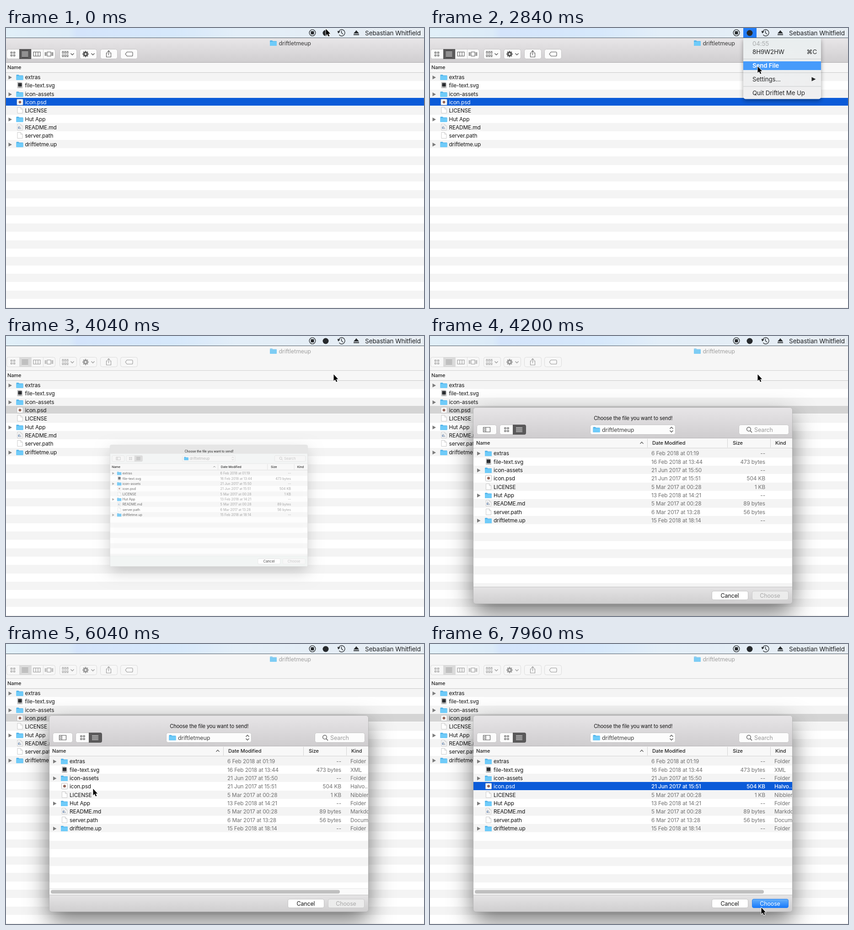
These frames come from a looping animation (914 by 613 pixels, 8 s). An HTML page with a canvas:

```html
<!DOCTYPE html>
<html lang="en">
<head>
<meta charset="utf-8">
<title>Choosing a file to send</title>
<style>
html, body { margin: 0; width: 100%; height: 100%; overflow: hidden; background: #fff; }
canvas { display: block; width: 914px; height: 613px; }
</style>
</head>
<body>
<canvas id="stage" width="914" height="613"></canvas>
<script>
const c = document.getElementById('stage').getContext('2d');
const LOOP = 8000, ROW = 18.33;

// name, icon, modified, size, kind
const files = [
  ['extras', 'folder', '6 Feb 2018 at 01:19', '--', 'Folder'],
  ['file-text.svg', 'svg', '16 Feb 2018 at 13:44', '473 bytes', 'XML'],
  ['icon-assets', 'folder', '21 Jun 2017 at 15:50', '--', 'Folder'],
  ['icon.psd', 'psd', '21 Jun 2017 at 15:51', '504 KB', 'Halvo...'],
  ['LICENSE', 'page', '5 Mar 2017 at 00:28', '1 KB', 'Nibbler'],
  ['Hut App', 'folder', '13 Feb 2018 at 14:21', '--', 'Folder'],
  ['README.md', 'md', '5 Mar 2017 at 00:28', '89 bytes', 'Markdown'],
  ['server.path', 'page', '6 Mar 2017 at 13:28', '56 bytes', 'Document'],
  ['driftletme.up', 'folder', '15 Feb 2018 at 18:14', '--', 'Folder']
];
const FOLDER = 'driftletmeup';

// pointer tip: time, x, y
const track = [
  [0, 699, 2], [40, 699, 2], [200, 702, 3], [720, 702, 3], [1480, 704, 12], [1560, 704, 12],
  [1960, 712, 121], [2160, 716, 88], [2560, 716, 88], [2760, 716, 84], [4760, 716, 84],
  [5560, 250, 248], [6040, 190, 317], [6400, 190, 317], [7040, 668, 491],
  [7440, 736, 562], [7840, 724, 577], [8000, 724, 577]
];

const clamp = v => Math.max(0, Math.min(1, v));

// slope at a key; zero at holds and turning points
function slope(i, k) {
  const a = track[i - 1], b = track[i], d = track[i + 1];
  if (!a || !d || (b[k] - a[k]) * (d[k] - b[k]) <= 0) return 0;
  return (d[k] - a[k]) / (d[0] - a[0]);
}

function pointerAt(t) {
  let i = 0;
  while (i < track.length - 2 && t >= track[i + 1][0]) i++;
  const a = track[i], b = track[i + 1], h = b[0] - a[0], u = clamp((t - a[0]) / h);
  const v = 1 - u;
  return [1, 2].map(k =>
    a[k] * (1 + 2 * u) * v * v + b[k] * u * u * (3 - 2 * u) +
    h * u * v * (slope(i, k) * v - slope(i + 1, k) * u));
}

function box(x, y, w, h, fill) { c.fillStyle = fill; c.fillRect(x, y, w, h); }

function round(x, y, w, h, r, fill, stroke) {
  c.beginPath(); c.roundRect(x, y, w, h, r);
  if (fill) { c.fillStyle = fill; c.fill(); }
  if (stroke) { c.strokeStyle = stroke; c.lineWidth = 1; c.stroke(); }
}

function disc(x, y, r, fill) {
  c.beginPath(); c.arc(x, y, r, 0, 7); c.fillStyle = fill; c.fill();
}

// open strokes or a filled shape from an SVG path
function path(d, color, width) {
  const p = new Path2D(d);
  if (width) { c.strokeStyle = color; c.lineWidth = width; c.stroke(p); }
  else { c.fillStyle = color; c.fill(p); }
}

function fade(y0, y1, a, b) {
  const g = c.createLinearGradient(0, y0, 0, y1);
  g.addColorStop(0, a); g.addColorStop(1, b);
  return g;
}

function text(s, x, y, size, color = '#111', weight = 400, align = 'left') {
  c.font = `${weight} ${size}px Inter, Roboto, sans-serif`;
  c.letterSpacing = '-0.1px';
  c.textAlign = align;
  c.fillStyle = color;
  c.fillText(s, x, y);
}

function at(x, y, draw) { c.save(); c.translate(x, y); draw(); c.restore(); }

function folder(x, y) {
  at(x, y, () => {
    path('M0 1.5Q0 .3 1.2 .3H5L6.5 1.8H14Q15 1.8 15 3V11Q15 12 14 12H1Q0 12 0 11Z', '#4fb3ea');
    round(0, 3, 15, 9, 1, '#6fcbf9');
  });
}

function fileIcon(kind, x, y) {
  if (kind === 'folder') return folder(x, y + 4);
  at(x, y, () => {
    if (kind === 'psd') {
      round(1.5, 3, 13, 12.5, 1, '#fff', '#bbb');
      return disc(8, 9.2, 3, '#94675a');
    }
    path('M2.5 2.5H9.5L13.5 6.5V15.5H2.5Z', '#fff');
    path('M2.5 2.5H9.5L13.5 6.5V15.5H2.5ZM9.5 2.5V6.5H13.5', '#c4c4c4', .9);
    if (kind === 'svg') {
      box(2.5, 3, 10.5, 12, '#c9c9c9');
      box(4, 4.5, 8, 7.5, '#2b2d31');
      box(5, 13, 6, 1, '#777');
    }
    if (kind === 'md') {
      path('M4.5 6.5H7.5M4.5 8.5H9M6 10.5H11M4.5 12.5H11', '#8d99a8', 1);
      box(4, 9, 2, 3, '#6d8fc0');
    }
  });
}

function fileRows(x, top, bottom, right, picked, pickFill, white, details) {
  for (let i = 0; top + i * ROW < bottom; i++) {
    const y = Math.round(top + i * ROW), next = Math.min(Math.round(top + (i + 1) * ROW), bottom);
    const left = x - 3, chosen = i === picked;
    box(left, y, right - left, next - y, i % 2 ? '#fff' : '#f4f4f4');
    if (chosen) box(left, y, right - left, next - y - 1, pickFill);
    const f = files[i];
    if (!f) continue;
    const ink = chosen && white ? '#fff' : '#111';
    if (f[1] === 'folder') at(x, y, () => path('M5.5 6V14.4L13 10.2Z', '#7c7c7c'));
    fileIcon(f[1], x + 22.5, y);
    text(f[0], x + 41.5, y + 14, 11.8, ink);
    if (details) details(f, y + 14, chosen);
  }
}

const GRID = 'M-4.5-4.5h3v3h-3zM1.5-4.5h3v3h-3zM-4.5 1.5h3v3h-3zM1.5 1.5h3v3h-3z';
const LIST = 'M-7-4.5H7M-7-1.5H7M-7 1.5H7M-7 4.5H7';
const CHEVRON = 'M-3.5-1.5L0 2L3.5-1.5';

function glyph(d, x, y, color, width = 1.1) { at(x, y, () => path(d, color, width)); }

function button(x, y, w, active) {
  round(x + .5, y + .5, w - 1, 21, 4, active ? '#fcfcfc' : '#f7f7f7', active ? '#c6c5c6' : '#dcdcdc');
}

function finder(active) {
  const ink = active ? '#555' : '#9a9a9a', edge = active ? '#d0d0d0' : '#dedede';
  box(0, 22, 914, 53, active ? fade(22, 75, '#e8e6e8', '#d0ced0') : '#f6f6f6');
  box(0, 75, 914, 1, active ? '#aeacae' : '#d0d0d0');
  c.save();
  if (!active) c.globalAlpha = .6;
  folder(577, 27);
  c.restore();
  text(FOLDER, 596.5, 38, 12.5, active ? '#3a3a3a' : '#a2a2a2');

  [[1, 107], [117, 38], [161, 38], [206, 38], [250, 38]].forEach(b => button(b[0], 46, b[1], active));
  [55, 81].forEach(x => box(x, 47, 1, 20, edge));
  box(29, 46, 26, 22, active ? '#5a595a' : '#dadada');
  glyph(GRID, 15, 57, ink);
  glyph(LIST, 41.5, 57, active ? '#fff' : '#8a8a8a', 1.2);
  glyph('M-7.5-4.5h15v9h-15zM-2.5-4.5v9M2.5-4.5v9', 67.5, 57, ink);
  glyph('M-4-4.5h8v9h-8zM-8.5-4v8M-6.5-4v8M6.5-4v8M8.5-4v8', 94, 57, ink);
  [-5, 0, 5].forEach(dx => glyph('M-1.5-4.5h3v3h-3zM-1.5 1.5h3v3h-3zM-2-6h4M-2 6h4', 129.5 + dx, 57, ink, .9));
  glyph(CHEVRON, 145, 57, ink, 1.4);
  at(174, 57, () => {
    for (let i = 0; i < 8; i++) { c.rotate(Math.PI / 4); box(-1.3, -6.8, 2.6, 4, ink); }
    c.beginPath(); c.arc(0, 0, 3.5, 0, 7);
    c.strokeStyle = ink; c.lineWidth = 3; c.stroke();
  });
  glyph(CHEVRON, 190, 57, ink, 1.4);
  glyph('M-2-2H-5V7H5V-2H2M0 3V-7M-3-4L0-7L3-4', 224.5, 56.5, ink);
  glyph('M-8 0L-4.5-4.5H6Q8-4.5 8-2.5V2.5Q8 4.5 6 4.5H-4.5Z', 269, 57, ink);

  box(0, 76, 914, 21, '#f7f7f7');
  box(0, 97, 914, 1, '#c9c9c9');
  text('Name', 3, 90, 11, '#222', 500);
  fileRows(0, 98, 613, 914, 3, active ? '#0b5bd8' : '#d4d4d4', active);
}

function menuBar(lit) {
  const g = c.createLinearGradient(0, 0, 914, 0);
  [[0, '#e1eff8'], [.15, '#dcebf8'], [.17, '#d4e4fb'], [.4, '#d6e8fb'], [.55, '#e3eef8'], [1, '#e7edf3']]
    .forEach(s => g.addColorStop(...s));
  box(0, 0, 914, 21, g);
  box(0, 21, 914, 1, '#505c66');
  const ink = '#272a2d';
  if (lit) box(685, 0, 29, 21, '#227cf6');
  c.beginPath(); c.arc(670, 10.5, 6.8, 0, 7);
  c.strokeStyle = ink; c.lineWidth = 1.3; c.stroke();
  round(666.5, 7, 7, 7, 1, ink);
  disc(699, 11, 6.5, ink);
  c.beginPath(); c.arc(734, 10.5, 7, -2.7, 2.5);
  c.lineWidth = 1.3; c.stroke();
  path('M724.5 6.5L731 7.5L726.5 12Z', ink);
  path('M733.5 6V10.5L737 13.5', ink, 1.3);
  path('M766 5L772 12H760ZM760 13.5H772V15.5H760Z', ink);
  text('Sebastian Whitfield', 907, 15.5, 13.6, '#1d1f21', 400, 'right');
}

const menuRows = [
  ['04:55', 39, '#a9acad'], ['8H9W2HW', 57], ['Send File', 87], ['Settings...', 117], ['Quit Driftlet Me Up', 147]
];

function menu(alpha, hoverY, blink) {
  c.save();
  c.globalAlpha = alpha;
  c.shadowColor = 'rgba(0,0,0,.35)'; c.shadowBlur = 10; c.shadowOffsetY = 4;
  round(685, 22, 170, 133.5, [0, 0, 5, 5], fade(22, 155, '#e9eeef', '#f0eff0'));
  c.shadowColor = 'transparent';
  [67, 97, 127].forEach(y => box(685, y, 170, 1.5, '#d5d7d8'));
  menuRows.forEach(([label, y, tint], i) => {
    const lit = i && !blink && hoverY >= y - 14 && hoverY < y + 5;
    if (lit) box(685, y - 14, 170, 19, '#469bfb');
    const ink = lit ? '#fff' : tint || '#262728';
    text(label, 705, y, 13.3, ink, i === 2 ? 600 : 400);
    if (i === 1) text('⌘C', 846, y, 13.3, ink, 400, 'right');
    if (i === 3) path('M834.5 107.5V116.5L843.5 112Z', ink);
  });
  c.restore();
}

function pushButton(label, x, w, fill, ink, edge) {
  round(x + .5, 558.5, w - 1, 19, 3.5, fill, edge);
  text(label, x + w / 2 - .5, 572.5, 12.4, ink, 400, 'center');
}

function dialog(scale, loaded, picked) {
  const active = scale === 1, ink = active ? '#555' : '#bbb';
  c.save();
  c.translate(443.5, 371.5); c.scale(scale, scale); c.translate(-443.5, -371.5);
  c.globalAlpha = Math.min(1, scale * 1.5);
  c.shadowColor = active ? 'rgba(0,0,0,.55)' : 'rgba(0,0,0,.2)';
  c.shadowBlur = 52 * scale; c.shadowOffsetY = 20 * scale;
  round(95, 157, 697, 429, 5, '#fff');
  c.shadowColor = 'transparent';
  round(95, 157, 697, 429, 5, null, active ? '#a9a9a9' : '#ccc');
  c.beginPath(); c.roundRect(95, 157, 697, 429, 5); c.clip();

  box(95, 157, 697, 66, active ? fade(157, 223, '#e7e5e7', '#cfcdcf') : '#f3f5f5');
  if (!active) box(95, 157, 697, 31, '#e6e6e6');
  box(95, 223, 697, 1, active ? '#b3b1b3' : '#ddd');
  text('Choose the file you want to send!', 444.3, 184, 11.1, '#111', 400, 'center');
  [[102, 44], [152, 58], [350, 187], [675, 110]].forEach(b => button(b[0], 194, b[1], active));
  round(181, 194, 29, 22, [0, 4, 4, 0], active ? '#5a595a' : '#dcdcdc');
  glyph('M-7.5-5h15v10h-15zM-2-5v10M-6-2.5h2.5M-6 0h2.5M-6 2.5h2.5', 124, 205, ink);
  glyph(GRID, 167.5, 205, ink);
  glyph(LIST, 195, 205, active ? '#fff' : '#aaa', 1.2);
  folder(356.5, 199);
  text(FOLDER, 376, 210, 12.5, active ? '#444' : '#b5b5b5');
  glyph('M-3.5-2L0-5.5L3.5-2M-3.5 2L0 5.5L3.5 2', 528, 205, ink, 1.4);
  c.beginPath(); c.arc(697, 204, 4.3, 0, 7);
  c.strokeStyle = ink; c.lineWidth = 1.3; c.stroke();
  path('M700 207.2L704 211.2', ink, 1.4);
  text('Search', 709, 210, 12.5, active ? '#999' : '#c4c4c4');

  box(95, 224, 697, 21, '#f8f8f8');
  box(95, 245, 697, 1, '#c9c9c9');
  [475, 650, 744].forEach(x => box(x, 225, 1, 19, '#d3d3d3'));
  [['Name', 101], ['Date Modified', 486], ['Size', 662], ['Kind', 755]]
    .forEach(h => text(h[0], h[1], 238, 11, '#222', 500));
  glyph('M-3.5 1.8L0-1.8L3.5 1.8', 463, 234, '#444', 1.2);

  c.save();
  if (!active) c.globalAlpha *= .65;
  fileRows(97.5, 247.4, 549, 792, picked ? 3 : -1, '#0b5bd8', true, (f, y, chosen) => {
    const tint = chosen ? '#fff' : '#707070', weight = chosen ? 500 : 400;
    text(f[2], 484, y, 11.8, tint, weight);
    text(f[3], 733, y, 11.8, tint, weight, 'right');
    if (loaded) text(f[4], 753, y, 11.8, tint, weight);
  });
  c.restore();
  if (loaded) {
    box(95, 535, 697, 14, '#fafafa');
    box(95, 535, 697, 1, '#e6e6e6');
    round(98, 538.5, 632, 8, 4, '#bfbfbf');
  }

  box(95, 549, 697, 37, active ? fade(549, 586, '#e5e4e5', '#cfcecf') : '#f1f5f4');
  box(95, 549, 697, 1, active ? '#c2c2c2' : '#e4e4e4');
  pushButton('Cancel', 616, 80, '#fff', active ? '#111' : '#444', active ? '#c4c4c4' : '#ddd');
  if (picked) pushButton('Choose', 704, 80, fade(558, 578, '#69b2fa', '#1477fb'), '#fff', '#2f83ec');
  else pushButton('Choose', 704, 80, active ? '#ececec' : '#f8f8f8', active ? '#a9a9a9' : '#c4c4c4', active ? '#cbcbcb' : '#e8e8e8');
  c.restore();
}

function pointer(x, y) {
  at(x, y, () => {
    const d = 'M.5 0V14.3L3.7 11.3L6.1 16.6L8.4 15.6L6 10.4H10.2Z';
    c.lineJoin = 'round';
    path(d, '#fff', 1.8);
    path(d, '#000');
    c.lineJoin = 'miter';
  });
}

function frame() {
  const t = performance.now() % LOOP, [x, y] = pointerAt(t);
  finder(t < 3320);
  menuBar(t >= 1000 && t < 3600);
  if (t >= 1000 && t < 3200) menu(clamp((3200 - t) / 240), y, t >= 2900 && t < 2950);
  if (t >= 3960) dialog(Math.min(1, .35 + (t - 3960) / 300), t >= 4500, t >= 6240);
  pointer(x, y);
  requestAnimationFrame(frame);
}
frame();
</script>
</body>
</html>
```
